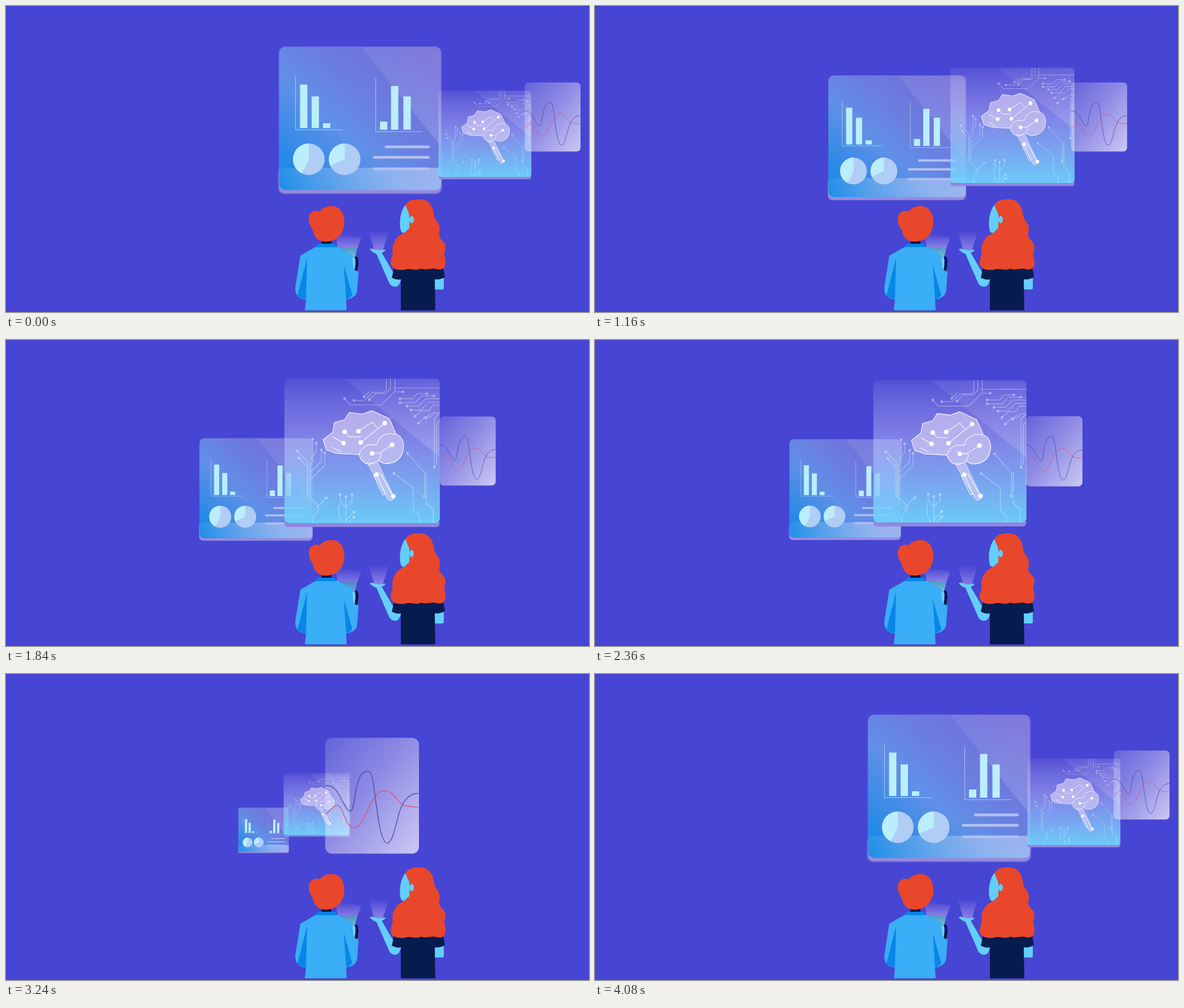
These frames come from a looping animation (1032x543 px, 4.12 s). An HTML page:

```html
<!DOCTYPE html>
<html lang="en">
<head>
<meta charset="utf-8">
<title>Floating dashboards</title>
<style>
html, body { margin: 0; width: 100%; height: 100%; overflow: hidden; background: #4745d3; }
svg { display: block; width: 1032px; height: 543px; }
.line { fill: none; stroke: #fff; }
</style>
</head>
<body>
<svg viewBox="0 0 1032 543">
<defs>
  <linearGradient id="blue" x1="0" y1="1" x2="1" y2="0">
    <stop offset="0" stop-color="#0c87e6"/><stop offset=".4" stop-color="#6090e7"/>
    <stop offset=".62" stop-color="#6c7cdf"/><stop offset="1" stop-color="#7468d8"/>
  </linearGradient>
  <linearGradient id="band">
    <stop offset="0" stop-color="#fff" stop-opacity=".06"/><stop offset="1" stop-color="#cfe4fa" stop-opacity=".5"/>
  </linearGradient>
  <linearGradient id="shine" x1="0" y1="0" x2=".7" y2="1">
    <stop offset="0" stop-color="#fff" stop-opacity=".06"/><stop offset="1" stop-color="#fff" stop-opacity=".15"/>
  </linearGradient>
  <linearGradient id="sky" x2="0" y2="1">
    <stop offset="0" stop-color="#fff" stop-opacity=".06"/><stop offset=".32" stop-color="#d2d0ff" stop-opacity=".36"/>
    <stop offset=".62" stop-color="#96c4fa" stop-opacity=".66"/><stop offset="1" stop-color="#6cd3fa" stop-opacity=".94"/>
  </linearGradient>
  <linearGradient id="glass" x2="1" y2="1">
    <stop offset="0" stop-color="#fff" stop-opacity=".16"/><stop offset=".45" stop-color="#f6f2ff" stop-opacity=".4"/>
    <stop offset="1" stop-color="#f6f2ff" stop-opacity=".76"/>
  </linearGradient>
  <linearGradient id="beam" x2="0" y2="1">
    <stop offset="0" stop-color="#d8c4ff" stop-opacity="0"/><stop offset="1" stop-color="#d8c4ff" stop-opacity=".48"/>
  </linearGradient>
  <linearGradient id="teal" x2="0" y2="1">
    <stop offset="0" stop-color="#4a94c2"/><stop offset="1" stop-color="#7cc8dc"/>
  </linearGradient>
  <pattern id="dots" width="5" height="5" patternUnits="userSpaceOnUse">
    <circle cx="1" cy="1" r=".55"/><circle cx="3.5" cy="3.5" r=".55"/>
  </pattern>
  <pattern id="pale" href="#dots" width="5" height="5" patternUnits="userSpaceOnUse">
    <path fill="#bdf0fd" d="M0 0h5v5H0z"/><g fill="#9adcf8"><circle cx="1" cy="1" r=".55"/><circle cx="3.5" cy="3.5" r=".55"/></g>
  </pattern>
  <pattern id="navy" width="5" height="5" patternUnits="userSpaceOnUse">
    <path fill="#061a4c" d="M0 0h5v5H0z"/><g fill="#1c3a74"><circle cx="1" cy="1" r=".5"/><circle cx="3.5" cy="3.5" r=".5"/></g>
  </pattern>
  <filter id="soft" x="-5%" y="-5%" width="110%" height="110%"><feGaussianBlur stdDeviation=".8"/></filter>
</defs>

<g id="charts">
  <rect x="483.5" y="72.5" width="287" height="254" rx="11" fill="#8d84e0" opacity=".8" filter="url(#soft)"/>
  <rect x="482.5" y="287" width="288.5" height="46" rx="10" fill="#958bdf" filter="url(#soft)"/>
  <rect x="483.5" y="72.5" width="286" height="254" rx="11" fill="url(#blue)"/>
  <path fill="url(#shine)" d="M629 72.5H759Q769.5 72.5 769.5 83V249Z"/>
  <path fill="url(#band)" d="M483 287H770V316Q770 326.5 759 326.5H494Q483 326.5 483 316Z"/>
  <path class="line" opacity=".5" d="M512.5 125V219.5H596M654.5 128V223H737"/>
  <path id="bars" fill="url(#pale)"/>
  <circle cx="536" cy="272" r="28" fill="#b0cdf6"/><circle cx="599.5" cy="272" r="28" fill="#b0cdf6"/>
  <path fill="url(#pale)" d="M536 272V244A28 28 0 0 0 523.5 297ZM599.5 272V244A28 28 0 0 0 574 283.500Z"/>
  <path fill="none" stroke="#b1bff1" stroke-width="5" stroke-linecap="round" d="M673 250H747.500M652 268.500H747.500M652 289H747.500"/>
</g>

<g id="brain">
  <path fill="#8f86e1" d="M501 322H772V325Q772 331 766 331H507Q501 331 501 325Z"/>
  <rect x="500.500" y="71" width="272" height="253" rx="8" fill="url(#sky)"/>
  <path fill="url(#shine)" d="M604 71H764Q772 71 772 79V208Z"/>
  <g opacity=".42">
    <path class="line" stroke-width="1.1" d="M606 106l10 11h54l24-24V71M622 109h19l14-14h20l4-4V71M649 108l11-11h18l8-8V71M640 103l10-10M708 94h-15M690 87h82
      M703 106h22l8-9h17M703 113h26l12-12h21M715 119h20l13-13h24M722 126h17l14-14h19M729 137l12-10h12l8-10h11M735 149l11-11h10l6-7h10M748 140l8-8M763 226V140l9-9M767 222V150l5-5
      M523 198l18 19v59l19 18v8l-9 10v12M526 210l15 16M550 177v40l-5 5v54M556 184v16l-11 12M565 196v20l-18 18M571 201v22l-24 24M574 280l-21 21
      M598 274v12l10 10v28M619 274v12l-11 10M608 278v18M596 290v22l6 12M622 305l-14 14M622 314l-10 10
      M716 202l30 34v41M692 237l34 25v40l11 10v12M749 234v56l12 10v24"/>
    <g id="pads" fill="#fff"></g>
  </g>
  <g fill="#d8cef5" fill-opacity=".65" stroke="#fff" stroke-width="1.1" stroke-linejoin="round">
    <path d="M645 218L681 282Q686 288 693 280L664 218Z" stroke-opacity=".55"/>
    <path d="M568 178L585 165L588 148L606 143L614 130L637 133L654 127L684 141L696 168Q709 174 709 190Q707 220 676 220L664 215Q656 221 648 221Q636 219 631 204L592 202L574 196Z"/>
    <path fill="none" d="M631 204C636 190 646 185 656 187L663 186C664 173 681 163 695 169M664 215Q672 206 668 201"/>
    <path fill="none" d="M606 164l8 9h20M630 163l24-16 9 10M604 184l-19-11M584 191l15 8M634 183l42-34M654 202h12l23-15M662 239l15 34-4 2-17-36M668 237l23 40"/>
  </g>
  <g id="nodes" fill="#fff"></g>
</g>

<g id="waves">
  <rect x="592" y="122" width="148.500" height="184" rx="11" fill="url(#glass)"/>
  <g fill="none" stroke-width="1.200">
    <path stroke="#e0506c" d="M592 243C600 240 602 231 610 229C621 227 622 264 638 265C656 265 662 207 686 206C700 206 705 222 714 228C722 232 732 232 740 232"/>
    <path stroke="#4a4a9e" d="M592 198C602 197 608 201 616 216C624 232 629 241 633 238C638 234 638 215 642 199C645 186 650 176 658 175C668 174 668 195 672 222C676 252 681 289 690 289C699 289 703 262 709 242C714 224 724 210 740 210"/>
  </g>
</g>

<g id="man">
  <g id="phoneBeam">
    <path fill="url(#beam)" d="M583 403L629 411L622 430H587Z"/>
    <path fill="url(#teal)" d="M586 427L622 430L617 449L611 441Z"/>
  </g>
  <path fill="#061a4c" d="M558.500 414H576V424H558.500Z"/>
  <path fill="#e9472b" d="M536 378C536 367 544 361 556 364C560 358 568 355 577 355C592 355 599 369 599 383C599 403 586 418 567 418C551 418 546 410 543 398C540 392 536 387 536 378Z"/>
  <path fill="#3aaef6" d="M549 427L521 443L512 500C512 514 519 520 531 521L529 540H603L602 521C614 518 622 515 622 500L624 472L612 441L586 427Z"/>
  <path fill="#0786e8" d="M553 422H581L587 428H547ZM533 447L516 514Q522 520 531 520ZM598 460L613 513Q609 519 602 520Z"/>
  <path fill="#74d0f8" d="M613 446L618 447L618 469L615 466Z"/>
  <path fill="#061a4c" d="M617 446Q620 442 623 447L624 455L622 471L617 468L620 452Z"/>
</g>

<g id="woman">
  <path id="handBeam" fill="url(#beam)" d="M642 399H678L667 434H652Z"/>
  <g fill="#64cefb">
    <path d="M655 438L664 436L686 474L700 484L697 492Q694 499 687 498Q681 497 678 491Z"/>
    <path d="M644 432Q646 429 652 432L661 434L672 432Q671 436 664 438L656 440Q648 437 644 432Z"/>
    <path d="M759 485L775 482V500Q775 503 772 503H759Z"/>
  </g>
  <path fill="url(#navy)" d="M687 464L683 482Q692 487 699 485V540H760L759 485Q770 486 777 481L774 464Z"/>
  <path fill="#e9472b" d="M707 353C712 345 720 343 732 343C748 343 756 354 758 372C759 381 768 384 768 396C767 404 765 408 770 414C779 422 779 428 777 434C774 441 778 446 778 455C778 466 772 469 763 467C752 464 745 470 735 466C725 471 715 464 706 468C692 470 682 466 681 456C681 447 686 442 684 434C683 424 689 416 693 410C700 404 710 402 712 396L715 372Z"/>
  <path fill="#64cefb" d="M707 353C698 364 695 385 699 399Q701 404 706 402L714 394V370Z"/>
  <ellipse cx="718" cy="379" rx="4" ry="6.500" fill="#64cefb"/>
</g>
</svg>

<script>
const $ = id => document.getElementById(id);

$('bars').setAttribute('d', [
  [520.5, 139.5, 77], [541, 160.5, 56], [561, 208, 8.5],
  [662, 205, 14.5], [681.5, 142, 77.5], [703.5, 160.5, 59]
].map(([x, y, h]) => `M${x} ${y}h13v${h}h-13z`).join(''));

const addDots = (id, r, points) => {
  $(id).innerHTML = points.split(' ').map(p => {
    const [x, y] = p.split(',');
    return `<circle cx="${x}" cy="${y}" r="${r}"/>`;
  }).join('');
};
addDots('pads', 2.4, '606,106 622,109 640,103 649,108 708,94 750,97 762,101 703,106 703,113 715,119 722,126 729,137 735,149 748,140 763,226 523,198 526,210 550,177 556,184 565,196 571,201 574,280 598,274 608,278 619,274 622,305 622,314 716,202 745,277 692,237');
addDots('nodes', 4, '606,164 630,163 604,184 634,183 676,149 654,202 689,187 662,239 691,277');

// Poses are [centre x, centre y, width]; home is the pose the artwork is drawn in.
const panels = [
  { el: $('charts'), home: [627, 199.75, 287],
    first: [627, 199.75, 287], second: [442.6, 263.3, 200],
    closing: [451.75, 274.5, 101.5], third: [456, 276.5, 89], opening: [481.3, 261, 134.3] },
  { el: $('brain'), home: [636.5, 197.5, 272],
    first: [847.75, 226.75, 164.5], second: [630.4, 196.7, 275.1],
    closing: [559.5, 226.5, 140], third: [550, 231, 117], opening: [602.2, 231.5, 124.5] },
  { el: $('waves'), home: [666.25, 214, 148.5],
    first: [967.5, 197, 99], second: [817.3, 197, 99],
    closing: [666.25, 214, 148.5], third: [648, 216, 166], opening: [704.5, 213, 143] }
];
const keys = [[960, 'first'], [1360, 'second'], [2320, 'second'], [2640, 'closing'],
  [2720, 'third'], [3680, 'third'], [3800, 'opening'], [4080, 'first']];
const MOVE = 400, LOOP = 4120, STEP = 40;

// Panels rest at the main poses and pass through the two in-between ones.
function slope(p, name, i) {
  if (name === 'closing') return (p.third[i] - p.second[i]) / MOVE;
  if (name === 'opening') return (p.first[i] - p.third[i]) / MOVE;
  return 0;
}

function pose(p, t) {
  const n = keys.findIndex(k => t < k[0]);
  if (n < 1) return p.first;
  const [t0, a] = keys[n - 1], [t1, b] = keys[n];
  const d = t1 - t0, u = (t - t0) / d, v = 1 - u;
  return p.home.map((_, i) =>
    v * v * (1 + 2 * u) * p[a][i] + u * u * (3 - 2 * u) * p[b][i] +
    d * u * v * (v * slope(p, a, i) - u * slope(p, b, i)));
}

const dip = (t, from, to) =>
  t > from && t < to ? Math.sin(Math.PI * (t - from) / (to - from)) ** 2 : 0;

function draw(now) {
  const t = Math.floor(now % LOOP / STEP) * STEP;
  for (const p of panels) {
    const [x, y, w] = pose(p, t), [hx, hy, hw] = p.home;
    p.el.setAttribute('transform', `translate(${x} ${y}) scale(${w / hw}) translate(${-hx} ${-hy})`);
  }
  $('handBeam').setAttribute('opacity', 1 - 0.75 * dip(t, 2240, 3120));
  $('phoneBeam').setAttribute('opacity',
    1 - 0.3 * (dip(t, 80, 1000) + dip(t, 1320, 2080) + dip(t, 3120, 3780)));
}

const start = performance.now();
function tick() {
  draw(performance.now() - start);
  requestAnimationFrame(tick);
}
tick();
</script>
</body>
</html>
```
